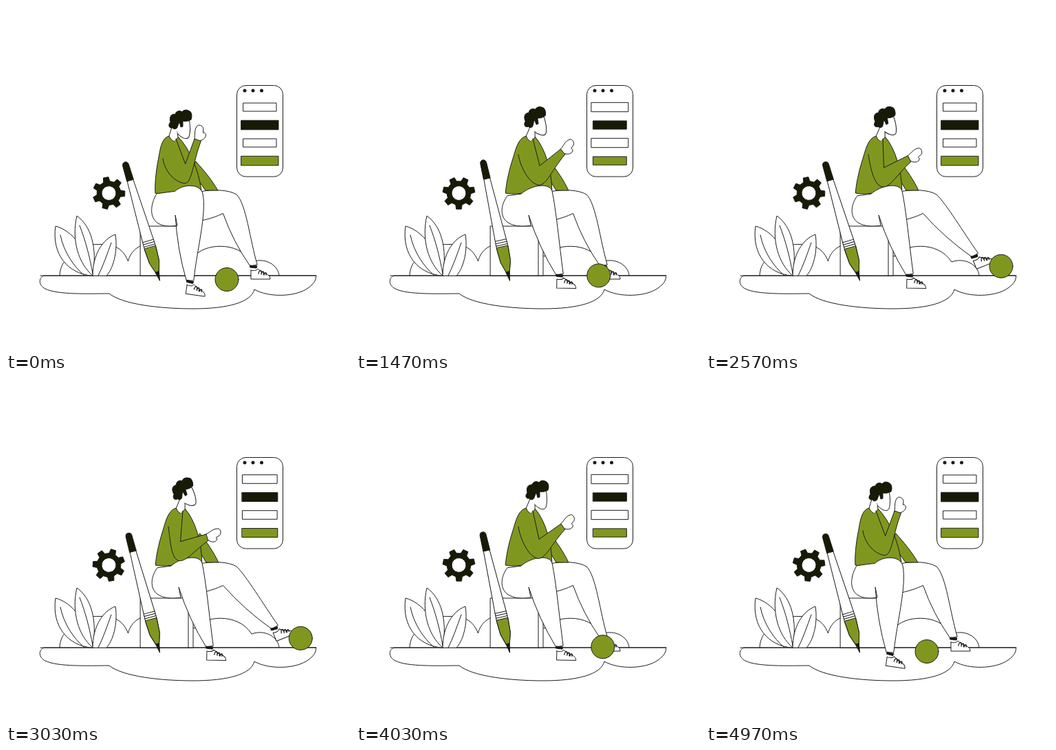
Recreate the animation shown at these times as an HTML page. Size 500 px wide and 500 px high, loop 5000 ms.

```html
<!DOCTYPE html>
<html lang="en">
<head>
<meta charset="utf-8">
<title>Person kicking a ball</title>
<style>
  html, body { margin: 0; width: 100%; height: 100%; overflow: hidden; background: #fff; }
  svg { display: block; width: 100vw; height: 100vh; }
  svg * { vector-effect: non-scaling-stroke; }
  .line { fill: none; }
  .green { fill: #80971f; }
  .dark { fill: #171a05; }
</style>
</head>
<body>
<svg viewBox="0 0 500 500" fill="#fff" stroke="#1c1c1c" stroke-width="1" stroke-linejoin="round" stroke-linecap="round">
  <defs>
    <g id="shoe">
      <path class="dark" d="M-5-4L5-3 4 0-5-1Z"/>
      <path d="M-4 3L-4 16H24C24 10 19 9 15 7 11 5 8 3 6 1 4 4 0 4-4 3Z"/>
      <path class="line" stroke-width="1.300" d="M7 8C8 2 12 2 11 7M11 9C12 3 16 4 14 9M15 10C16 5 20 6 18 10"/>
    </g>
  </defs>

  <!-- scenery -->
  <path d="M78 392C79 371 92 362 107 361 113 348 125 346 136 346.500 158 345 171 354 177.500 371 181 356 194 346 208 346 240 344 262 356 274 364 286 346 337 340 357 372 376 365 396 376 397 392"/>
  <path d="M55 392C47 395 47 406 57 411 75 420 120 418 150 418 170 434 225 440 272 440 322 440 356 431 361 412 382 424 421 423 439 410 449 403 451 397 450.500 392Z"/>
  <path d="M195.500 320H272V392H195.500ZM265 320V392"/>
  <path d="M124 392C91 389 66 362 72 320 96 326 118 354 126 392"/>
  <path d="M126 392C105 374 95 340 103 305 124 320 133 352 126 392"/>
  <path d="M126 392C126 362 140 339 159 332 163 358 155 383 146 392"/>
  <path class="line" d="M79 333C84 358 99 379 113 391M107 319C116 342 122 366 126 389M153 344C147 361 141 378 134 392M50 392H451"/>

  <g id="pencil">
    <path d="M-4.500-152L-8.200-60-8.500-47-7.300-28-2.600-13H2.600L7.300-28 8.500-47 8.200-60 4.500-152Z"/>
    <path class="green" d="M-8.500-50L-7.300-28-2.600-13H2.600L7.300-28 8.500-50Z"/>
    <path class="line" d="M-8.200-60H8.200M-8.300-56.500H8.300M-8.500-53H8.500"/>
    <path class="dark" d="M-2.600-13H2.600L0 0ZM-5-152L-4.500-175C-4-181 4-181 4.500-175L5-152Z"/>
  </g>
  <path id="gear" class="dark"/>

  <rect x="335.500" y="115.500" width="67" height="132.500" rx="13"/>
  <path stroke-width="5" d="M347 123h0M359 123h0M371.500 123h0"/>
  <g id="bars"></g>

  <!-- person -->
  <path id="backLeg"/>
  <use id="backShoe" href="#shoe"/>
  <g id="body">
    <path class="green" d="M276 226C287 238 300 254 308 268L290 268 270 240Z"/>
    <path class="green" d="M237 189C225 192 224 210 221 225 218 240 216 260 217 272 228 274 240 273 250 270L284 268C280 240 268 208 250 190Z"/>
    <path d="M241 176L237 189C240 195 243 196 245 197L250 191 249 182"/>
  </g>
  <g id="head">
    <path d="M246 171L266 164C268 174 268 184 266 190 263 196 254 191 250 186"/>
    <path class="dark" d="M239 169C235 173 237 178 242 177 244 180 248 179 249 176L252 168 254 176 257 175 257 167C261 168 266 167 269 165 271 160 270 154 266 152.500 262 150 258 151 256 154 252 151 247 153 246 157 240 157 237 161 239 169Z"/>
  </g>
  <path id="frontLeg"/>
  <use id="frontShoe" href="#shoe"/>
  <path id="hand" d="M0-5C7-5 12-9 19-6 23-5 22 2 18 4L12 5C14 9 9 11 5 9 3 8 1 6 0 4"/>
  <path id="sleeve" class="green"/>
  <circle id="ball" class="green" r="17"/>
</svg>
<script>
const LOOP = 5000;
const $ = id => document.getElementById(id);
const draw = (id, d) => $(id).setAttribute('d', d);
const move = (id, transform) => $(id).setAttribute('transform', transform);
const place = (id, [x, y], angle = 0) => move(id, `translate(${x} ${y}) rotate(${angle})`);
const mix = (a, b, k) => a.map((v, i) => v + (b[i] - v) * k);
const add = ([x, y], dx, dy) => [x + dx, y + dy];
const polar = (r, degrees) => {
  const a = degrees * Math.PI / 180;
  return [r * Math.cos(a), r * Math.sin(a)];
};
const ease = (t, start, length) => {
  const u = Math.min(1, Math.max(0, (t - start) / length));
  return u * u * (3 - 2 * u);
};

// Upper cuff position and forearm angle.
const raised = [274, 193, -70];
const relaxed = [298, 212, -35];
const waving = [297, 203, -43];
const lowered = [291, 227, -16];
const armPoses = [raised, relaxed, waving, lowered, relaxed];

const bars = ['', 'dark', '', 'green'].map((shade, i) => {
  const bar = document.createElementNS('http://www.w3.org/2000/svg', 'rect');
  bar.setAttribute('class', shade);
  $('bars').append(bar);
  return { bar, y: 147 + 26 * i, sign: i % 2 ? 1 : -1 };
});

function drawGear(teeth = 7) {
  const step = 360 / teeth;
  const tooth = i => [
    polar(17.5, (i - .3) * step), polar(23.5, (i - .18) * step),
    polar(23.5, (i + .18) * step), polar(17.5, (i + .3) * step)
  ].join('L');
  const rim = Array.from({ length: teeth }, (_, i) => tooth(i)).join('L');
  draw('gear', `M${rim}ZM10.5 0A10.5 10.5 0 1 0-10.5 0A10.5 10.5 0 1 0 10.5 0Z`);
  $('gear').setAttribute('fill-rule', 'evenodd');
}

function drawProps(t) {
  const swing = Math.cos(t / 2500 * 2 * Math.PI);
  place('pencil', [223.5, 399], -14.4 - 2.05 * swing);
  place('gear', [149.5, 272], 60 * t / 1000 - 101);
  for (const { bar, y, sign } of bars) {
    const half = 25.5 + sign * 1.5 * swing;
    const box = { x: 369 - half, y: y - half / 4, width: 2 * half, height: half / 2 };
    for (const name in box) bar.setAttribute(name, box[name]);
  }
  const roll = ease(t, 800, 1880) - ease(t, 2890, 1890);
  place('ball', mix([321, 397.5], [430, 378], roll));
}

// Lower leg from the kneecap round the ankle and up to the back of the knee.
function shin(knee, ankle, tilt, backKnee, [bulgeX, bulgeY]) {
  const [dx, dy] = polar(5.3, tilt);
  const front = add(ankle, dx, dy);
  const back = add(ankle, -dx, -dy);
  const bend = add(mix(back, backKnee, .5), -5, 3);
  return `C${add(knee, bulgeX, bulgeY)} ${mix(front, knee, .35)} ${front}L${back}Q${bend} ${backKnee}`;
}

function drawLegs(lean, kick) {
  const backAnkle = mix([360, 377], [391, 362], kick);
  const backTilt = -22 * kick;
  draw('backLeg', 'M282 270C300 266 324 267 335 274' +
    shin([335, 274], backAnkle, backTilt - 10, [315.5, 301.5], [14, 13]) + 'C306 306 297 309 284 312Z');
  place('backShoe', add(backAnkle, 0, 4), backTilt);

  const knee = [286 - lean, 273 - 4 * lean];
  const crotch = [246 + 5 * lean, 304];
  const frontAnkle = mix([267.5, 399], [296, 390], lean);
  draw('frontLeg', `M${246 - 6 * lean} ${269 + 4 * lean}C256 259 282 257 ${knee}` +
    shin(knee, frontAnkle, -10 * lean, crotch, [6, 28]) +
    `L${add(crotch, 3, 15)}C205 326 207 292 ${219 + lean} ${273 + 3 * lean}Z`);
  place('frontShoe', add(frontAnkle, 0, 4), 8 - 7 * lean);
}

function drawBody(t, lean) {
  const shear = .12 * lean;
  move('body', `matrix(1 0 ${-shear} 1 ${shear * 275} 0)`);

  const nod = ease(t, 0, 1000) - ease(t, 1000, 1000) + ease(t, 2000, 1000) - ease(t, 3000, 1000);
  move('head', `translate(${10 * lean} ${-2 * lean}) rotate(${-17 * nod} 243 186)`);

  const second = Math.floor(t / 1000);
  const [x, y, angle] = mix(armPoses[second], armPoses[(second + 1) % 5], ease(t, second * 1000, 1000));
  const upper = [x, y];
  const lower = add(upper, ...polar(10, angle + 90));
  const innerElbow = add(upper, ...polar(-39, angle));
  const elbow = add(innerElbow, -1, 28);
  const shoulder = mix([228, 222], [236, 216], lean);
  const chest = [247 + 10 * lean, 193];
  draw('sleeve', `M${shoulder}C${add(shoulder, 3, 20)} ${add(elbow, -13, -1)} ${elbow}` +
    `C${add(elbow, 11, 0)} ${mix(elbow, lower, .5)} ${lower}L${upper}L${innerElbow}L${chest}`);
  place('hand', mix(upper, lower, .5), angle - 6);
}

function render(t) {
  const lean = ease(t, 0, 1000) - ease(t, 4000, 1000);
  const kick = ease(t, 1600, 900) - ease(t, 3000, 700);
  drawProps(t);
  drawLegs(lean, kick);
  drawBody(t, lean);
}

drawGear();
const start = performance.now();
function tick() {
  render((performance.now() - start) % LOOP);
  requestAnimationFrame(tick);
}
tick();
</script>
</body>
</html>
```
